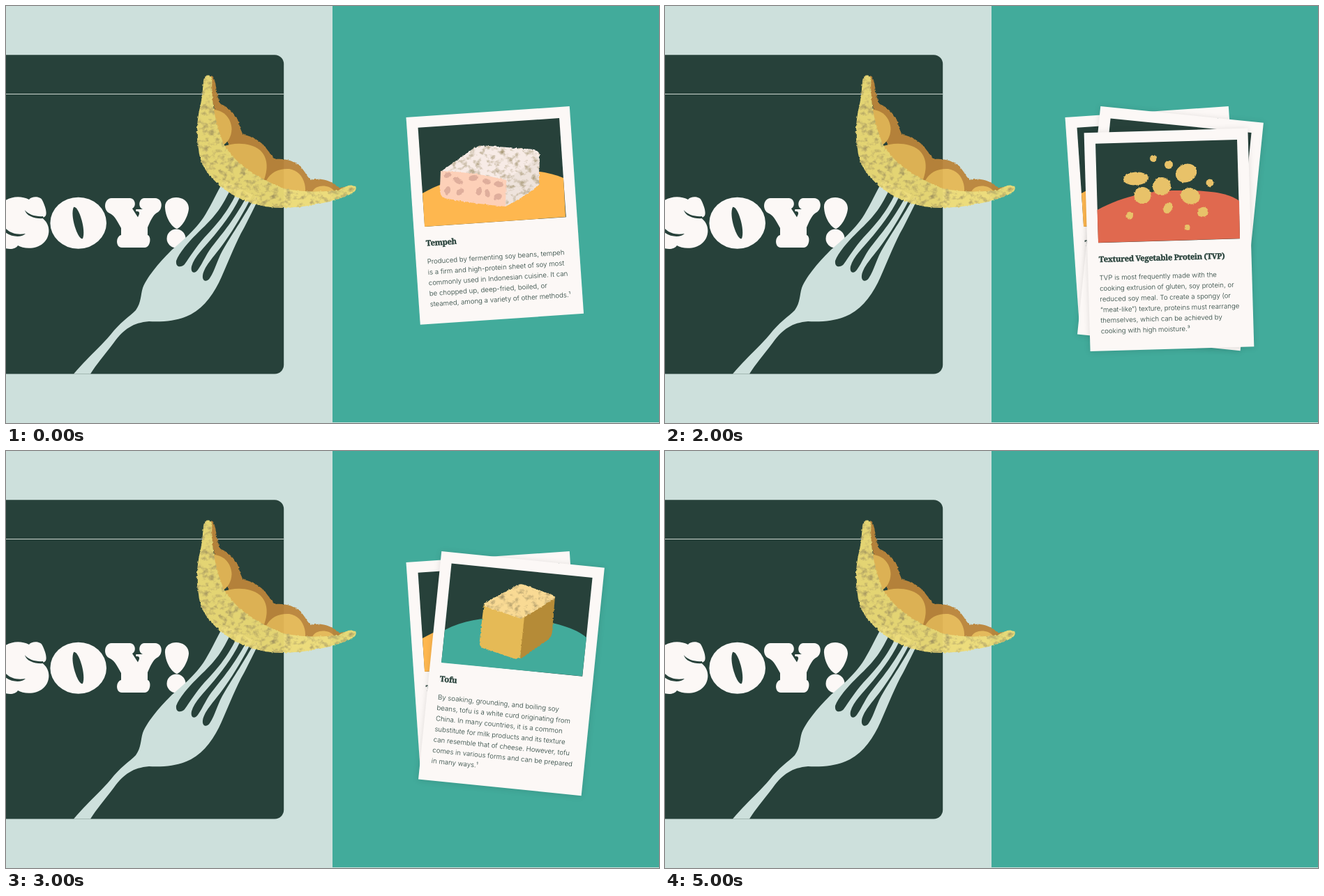
Animation, 936 px wide and 599 px high, one loop 6 s. Source, as an HTML page:

```html
<!DOCTYPE html>
<html lang="en">
<head>
<meta charset="utf-8">
<title>Soy cards</title>
<style>
  html, body { margin: 0; width: 100%; height: 100%; overflow: hidden; background: #cde0dc; }
  svg { display: block; width: 100%; height: 100%; }
  .dark { fill: #27413a; }
  .pale { fill: #cde0dc; }
  .cream { fill: #fcf8f6; }
  .teal { fill: #42ab9b; }
  .word { font: 700 54px "Noto Serif", serif; }
  .title { font: 700 11.3px "Noto Serif", serif; letter-spacing: -.33px; fill: #27413a; stroke: #27413a; stroke-width: .35; }
  .body { font: 300 9.7px Inter, "Open Sans", sans-serif; fill: #27413a; }
  .lifted { filter: drop-shadow(0 1px 4px rgba(0, 0, 0, .12)); }
  .tempeh, .tofu, .tvp { animation: 6s step-end infinite; }
  .tempeh { animation-name: tempeh; }
  .tofu { animation-name: tofu; }
  .tvp { animation-name: tvp; }
  @keyframes tempeh { 0% { visibility: visible } 83.33% { visibility: hidden } }
  @keyframes tofu { 0% { visibility: hidden } 16.66% { visibility: visible } 66.66% { visibility: hidden } }
  @keyframes tvp { 0% { visibility: hidden } 33.33% { visibility: visible } 50% { visibility: hidden } }
</style>
</head>
<body>
<svg viewBox="0 0 936 599" preserveAspectRatio="none">
  <defs>
    <filter id="rough" color-interpolation-filters="sRGB">
      <feTurbulence type="fractalNoise" baseFrequency=".3" numOctaves="2" seed="4"/>
      <feDisplacementMap in="SourceGraphic" scale="3" xChannelSelector="R" yChannelSelector="G"/>
    </filter>
    <filter id="chalk" color-interpolation-filters="sRGB">
      <feTurbulence type="fractalNoise" baseFrequency=".3" numOctaves="2" seed="4" result="fine"/>
      <feDisplacementMap in="SourceGraphic" in2="fine" scale="3" xChannelSelector="R" yChannelSelector="G" result="shape"/>
      <feTurbulence type="fractalNoise" baseFrequency=".11 .14" numOctaves="4" seed="9"/>
      <feColorMatrix values="0 0 0 0 .58  0 0 0 0 .52  0 0 0 0 .36  2 0 0 0 -.96"/>
      <feComposite operator="in" in2="shape" result="grain"/>
      <feMerge><feMergeNode in="shape"/><feMergeNode in="grain"/></feMerge>
    </filter>
  </defs>

  <rect class="pale" width="936" height="599"/>
  <rect class="teal" x="468" width="468" height="598"/>
  <rect class="dark" x="-30" y="70.3" width="428.2" height="458.2" rx="13"/>
  <path d="M0 126.5H398" stroke="#cdd6cf"/>

  <!-- Live word, fattened by the lettering drawn over it -->
  <g class="cream">
    <text class="word" y="331" x="8 82 163 235">SOY!</text>
    <path d="M-12 292C-4 275 17 270 33 278C37 273 49 273 52 279C56 287 59 296 57 301C55 304 52 304 51 304C65 313 64 332 53 341C43 350 25 349 17 344C13 351 0 350 -8 345Z"/>
    <ellipse cx="103.7" cy="311.7" rx="40.3" ry="37"/>
    <path d="M151 276H178C186 277 187 288 181 291L190 305L196 292C189 289 190 277 198 276H214C225 277 225 291 218 296C212 299 209 304 203 318V329C209 331 207 347 199 347H166C157 347 157 331 165 329V319C158 306 155 301 149 298C139 294 140 277 151 276Z"/>
    <path d="M228 290C226 270 262 270 262 291C261 303 252 318 245 320C238 318 229 305 228 290Z"/>
    <circle cx="244" cy="334" r="13.5"/>
  </g>
  <g class="dark">
    <path d="M97 289C104 286 115 322 110 334C104 338 91 302 97 289Z"/>
    <path d="M27 293C32 300 44 303 53 302L54 305C42 306 29 302 27 293Z"/>
    <path d="M-1 319C6 327 17 329 28 327C22 333 8 332 -1 325Z"/>
  </g>

  <path class="pale" d="M312 250C300 273 292 290 283 304C271 322 252 338 238 350C224 364 203 387 196 405C193 414 194 426 186 437C177 446 163 455 150 472C133 492 118 504 97 528.5H121C130 514 143 499 155 483C169 464 182 455 205 453C232 454 249 451 265 443C285 432 299 412 309 389C321 362 330 338 341 319C349 303 356 290 362 276Z"/>
  <g class="dark">
    <path d="M324 258C310 290 298 303 285 316C267 333 249 352 244 366C243 376 251 376 256 371C264 360 273 345 284 333C302 314 316 298 330 270Z"/>
    <path d="M340 264C328 293 314 310 299 329C284 347 270 360 266 374C264 384 271 385 275 379C283 368 287 355 299 341C315 321 329 303 346 272Z"/>
    <path d="M354 270C340 298 328 318 314 338C301 357 284 373 282 387C281 396 288 397 292 391C300 380 303 362 314 345C327 323 340 305 358 272Z"/>
  </g>

  <g opacity=".95">
    <path filter="url(#rough)" fill="#bc853a" d="M292 102C297 97 299 105 301 116C303 130 305 138 308 141C319 145 327 155 332 163C335 171 336 180 341 185C353 187 365 194 372 203C378 211 382 217 387 220C399 219 414 222 423 232C429 238 432 246 437 250C450 247 462 250 469 255C476 262 483 261 490 259L488 267L400 268C350 252 310 210 292 120Z"/>
    <g fill="#e6b856">
      <path d="M298 149C313 150 323 162 323.500 177C323 188 318 196 311 200C303 188 298 168 298 149Z"/>
      <path d="M311 202C325 196 350 195 364 207C375 217 376 233 370 249C345 240 322 224 311 202Z"/>
      <path d="M373 251C379 238 393 233 406 234C420 236 430 249 429 267C410 268 388 262 373 251Z"/>
      <path d="M439 267C444 256 463 256 471 266Z"/>
    </g>
    <path filter="url(#chalk)" fill="#eedc77" d="M283 108C284 97 295 97 295.500 106C294 135 299 168 313 200C330 228 362 248 398 262C425 268 458 267 478 264C486 259 497 255 501 259C504 264 498 269 490 272C470 281 430 290 393 290C357 289 325 276 301 253C285 238 277 222 276 205C272 190 274 165 277 150C281 135 282 120 283 108Z"/>
  </g>

  <g id="cards"></g>
</svg>
<script>
  const path = (fill, d, filter = "") => `<path fill="${fill}" d="${d}"${filter && ` filter="url(#${filter})"`}/>`;
  const blobs = (fill, list) => `<g fill="${fill}" filter="url(#rough)">` + list.map(([x, y, rx, ry, tilt = 0]) =>
    `<ellipse rx="${rx}" ry="${ry}" transform="translate(${x} ${y}) rotate(${tilt})"/>`).join("") + "</g>";

  const tempehArt =
    path("#feb74f", "M597 269C650 238 745 224 799 247L802 303L600 317Z") +
    path("#eee3dc", "M715 250L765 213L764 257Q742 275 716 288Z", "chalk") +
    path("#f7ebe6", "M623 238L668 206Q676 200 685 200.500L757 206Q765 209 765 215L720 248Q712 253 700 250Z", "chalk") +
    path("#fdd0b8", "M623 237Q670 238 717 250L716 288Q670 284 628 276Q621 273 622 260Z", "rough") +
    blobs("#dfae9c", [
      [633, 243, 6, 3.5, -20], [648, 251, 8, 4, 30], [670, 247, 7, 4, -10], [689, 252, 6, 4, 20],
      [706, 256, 7, 4, 10], [633, 265, 4, 6, 15], [651, 267, 6, 4, -35], [678, 266, 4, 6, 10],
      [690, 269, 3.5, 6, -15], [705, 274, 6, 4.5, -20]]);

  const tofuArt =
    path("#42ab9b", "M629 257C660 241 690 239 725 240C770 241 815 252 832 268L826 323.500L624 304Z") +
    path("#b58b37", "M740 238L787 209L783 258Q783 265 777 271L737 299Z", "rough") +
    path("#e5ba56", "M685 219L743 238L737 297Q733 300 728 298L683 283Q678 280 679 272Z", "rough") +
    path("#f9da94", "M685 219L732 193Q737 190 742 192L784 207Q790 210 785 213L746 237Q741 241 735 240L688 224Q684 222 685 219Z", "chalk");

  const tvpArt =
    path("#e0694f", "M619.500 293C660 271 700 265 735 265C775 265 805 267 823 280L824 334L621 340Z") +
    blobs("#e8c269", [
      [675, 248, 18, 9.5, -4], [747, 240, 15.5, 13, -25], [712, 259, 13, 13], [684.5, 272, 12, 12],
      [753, 273, 14, 11.5, 15], [722, 228, 6, 6], [700, 219, 5, 5], [781, 254, 5.5, 5.5],
      [666, 301, 5, 5.5], [721, 290, 6, 8.5, 30], [771, 296, 8, 7, -20], [748.5, 318, 4, 4]]);

  const cards = [
    { name: "tempeh", x: 573.5, y: 160, tilt: -3.9, title: "Tempeh", art: tempehArt, lines: [
      "Produced by fermenting soy beans, tempeh",
      "is a firm and high-protein sheet of soy most",
      "commonly used in Indonesian cuisine. It can",
      "be chopped up, deep-fried, boiled, or",
      "steamed, among a variety of other methods.¹"] },
    { name: "tofu lifted", x: 624.3, y: 144, tilt: 5.8, title: "Tofu", art: tofuArt, lines: [
      "By soaking, grounding, and boiling soy",
      "beans, tofu is a white curd originating from",
      "China. In many countries, it is a common",
      "substitute for milk products and its texture",
      "can resemble that of cheese. However, tofu",
      "comes in various forms and can be prepared",
      "in many ways.¹"] },
    { name: "tvp lifted", x: 600.6, y: 182.3, tilt: -1.65, title: "Textured Vegetable Protein (TVP)", art: tvpArt, lines: [
      "TVP is most frequently made with the",
      "cooking extrusion of gluten, soy protein, or",
      "reduced soy meal. To create a spongy (or",
      "“meat-like”) texture, proteins must rearrange",
      "themselves, which can be achieved by",
      "cooking with high moisture.³"] }
  ];

  const LEADING = 15.3;
  const drawCard = ({ name, x, y, tilt, title, art, lines }) => `
    <g class="${name}">
      <g transform="translate(${x} ${y}) rotate(${tilt})">
        <rect class="cream" width="234.800" height="${222 + LEADING * lines.length}"/>
        <rect class="dark" x="16" y="16" width="203" height="142.400"/>
        <text class="title" x="16" y="186.300">${title}</text>
        ${lines.map((line, i) => `<text class="body" x="16" y="${212.2 + LEADING * i}">${line}</text>`).join("")}
      </g>
      ${art}
    </g>`;

  document.getElementById("cards").innerHTML = cards.map(drawCard).join("");
</script>
</body>
</html>
```
